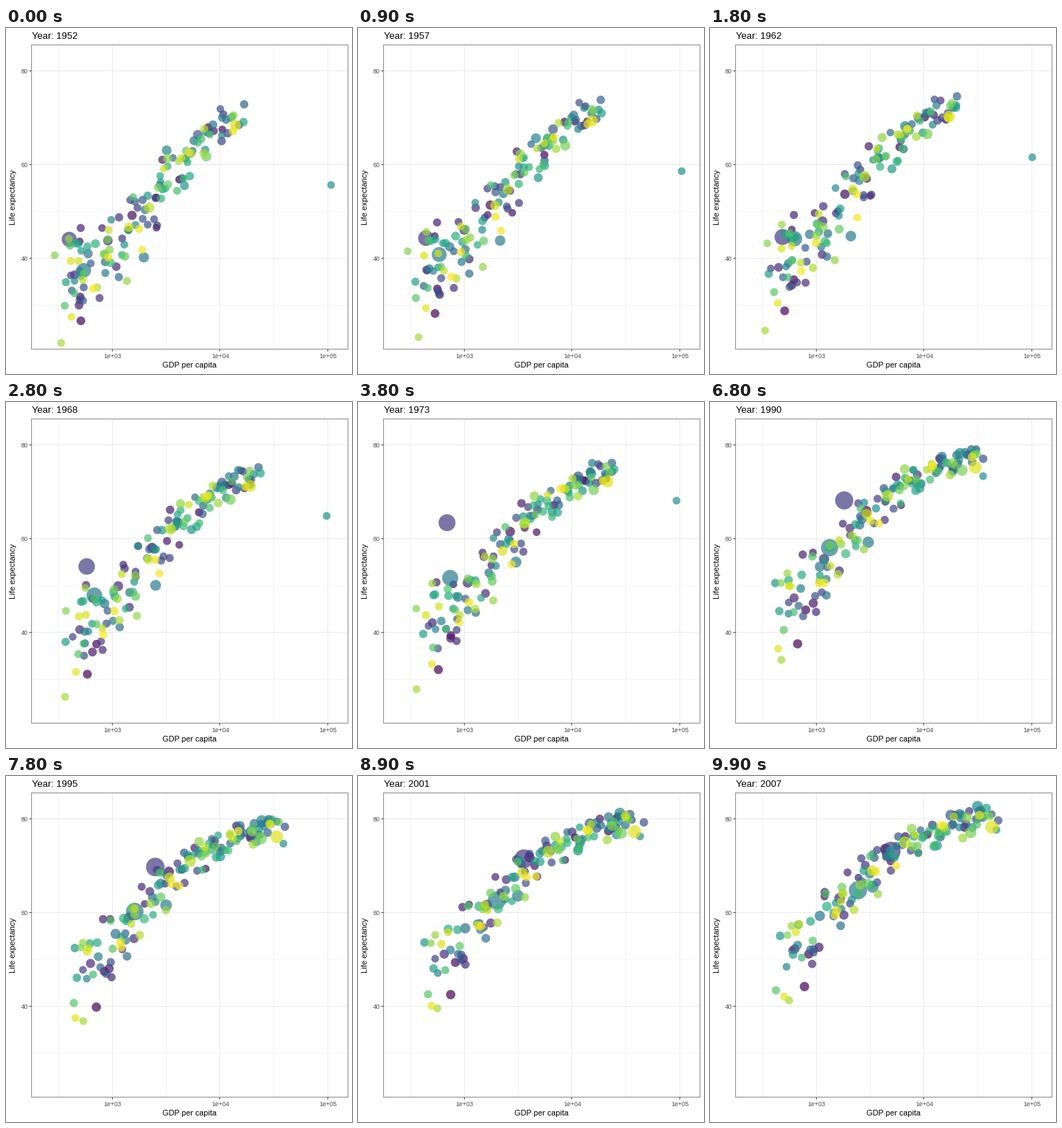
Recreate the animation shown at these times as a matplotlib script. Size 480 by 480 pixels, loop 10 s.

```python
import matplotlib.pyplot as plt
import numpy as np
from matplotlib.animation import FuncAnimation

SIZE, DPI = 480, 100
FRAMES, INTERVAL = 100, 100
START, END = 1952, 2007
COUNT = 142
PX = 72 / DPI  # points per pixel
LEFT, TOP, RIGHT, BOTTOM = 35, 23, 474, 445
GRID, INK = "#ebebeb", "#4d4d4d"

# Dots that stand apart: colour rank -> final millions, (year, gdp, life) key points
LEADERS = {
    24: (1319, [(1952, 400, 44), (1962, 488, 44.5), (1973, 690, 63.3), (2007, 4959, 73)]),
    58: (1110, [(1952, 547, 37.4), (1973, 740, 51.5), (2007, 2452, 64.7)]),
    66: (127, [(1952, 3217, 63), (1973, 15100, 73.8), (2007, 31656, 82.6)]),
    71: (2.5, [(1952, 108382, 55.6), (1973, 95400, 68), (1982, 31354, 71.3),
               (2007, 47307, 77.6)]),
    134: (301, [(1952, 13990, 68.4), (2007, 42952, 78.2)]),
}

rng = np.random.default_rng(12)
years = np.linspace(START, END, FRAMES)
survey = np.arange(START, END + 1, 5)
s = (years - START) / (END - START)


def mix(a, b, t=s):
    return a + (b - a) * t


def drift(step):
    walk = np.cumsum(rng.normal(0, step, survey.size))
    return np.interp(years, survey, walk - walk.mean())


def leader_track(points):
    when, gdp, life = np.array(points, float).T
    return np.interp(years, when, np.log10(gdp)), np.interp(years, when, life)


def crowd_track(wealth, luck):
    """Income follows the dot's rank; life expectancy is an S-curve of income."""
    gdp = mix(2.55 + 1.6 * wealth ** 1.15, 2.65 + 2.0 * wealth ** .95, s ** .8)
    gdp = gdp + drift(.035)
    share = 1 / (1 + np.exp(-mix(3.5, 2.6) * (gdp - mix(3.4, 3.2))))
    life = mix(33, 40) + mix(39, 41) * share
    return gdp, life + luck * (1 + 5 * (1 - share)) + drift(.4)


tracks = np.empty((COUNT, 2, FRAMES))
millions = np.clip(rng.lognormal(np.log(10), 1.3, COUNT), .3, 190)
wealth = rng.permutation(np.linspace(0, 1, COUNT))
luck = np.clip(rng.normal(size=COUNT), -2, 1.8)
for rank in range(COUNT):
    if rank in LEADERS:
        millions[rank], points = LEADERS[rank]
        tracks[rank] = leader_track(points)
    else:
        tracks[rank] = crowd_track(wealth[rank], luck[rank])

radius = 5.1 + 8.3 * np.sqrt(millions[:, None] * mix(.42, 1) / 1319)
areas = (2 * radius * PX) ** 2

fig = plt.figure(figsize=(SIZE / DPI, SIZE / DPI), dpi=DPI, facecolor="white")
ax = fig.add_axes([LEFT / SIZE, 1 - BOTTOM / SIZE,
                   (RIGHT - LEFT) / SIZE, (BOTTOM - TOP) / SIZE])
ax.set_xlim(2.249, 5.189)
ax.set_ylim(20.65, 85.55)
ax.set_axisbelow(True)
ax.set_xticks([3, 4, 5])
ax.set_yticks([40, 60, 80])
ax.tick_params(length=2.75 * PX, width=PX, color="#333333",
               labelbottom=False, labelleft=False)
ax.grid(color=GRID, linewidth=PX)
for x in (2.5, 3.5, 4.5):
    ax.axvline(x, color=GRID, lw=.6 * PX, zorder=.5)
ax.axhline(30, color=GRID, lw=.6 * PX, zorder=.5)
ax.axhline(50, color="#f3f3f3", lw=.6 * PX, zorder=.5)
for side in ax.spines.values():
    side.set(color="#8c8c8c", linewidth=PX)


def label(x, y, text, px, color="black", ha="center", va="baseline", **kw):
    return fig.text(x / SIZE, 1 - y / SIZE, text, fontsize=px * PX, color=color,
                    ha=ha, va=va, family="Liberation Sans", **kw)


for i in range(3):
    label(148 + 149.2 * i, 458, f"1e+0{3 + i}", 8.8, INK)
    label(30.5, 63 + 130 * i, 80 - 20 * i, 8.8, INK, ha="right")
label(255, 471, "GDP per capita", 11)
label(10, 234.5, "Life expectancy", 11, va="center", rotation=90)
title = label(35.5, 15, "", 13.2, ha="left")

dots = ax.scatter(tracks[:, 0, 0], tracks[:, 1, 0], s=areas[:, 0],
                  c=plt.get_cmap("viridis")(np.linspace(0, 1, COUNT)),
                  alpha=.7, linewidths=0, zorder=3)


def draw(i):
    dots.set_offsets(tracks[:, :, i])
    dots.set_sizes(areas[:, i])
    title.set_text(f"Year: {round(years[i])}")
    return dots, title


anim = FuncAnimation(fig, draw, frames=FRAMES, interval=INTERVAL,
                     repeat=True, repeat_delay=0)
plt.show()
```
